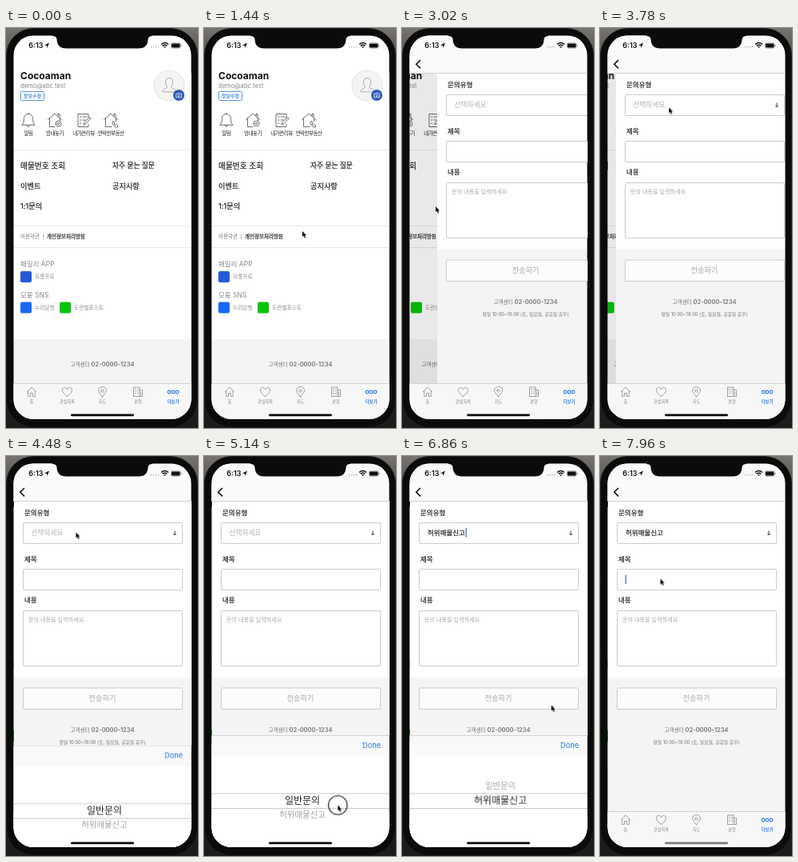
These frames come from a looping animation (240 px wide and 500 px high, 8 s). An HTML page:

```html
<!DOCTYPE html>
<html lang="ko">
<head>
<meta charset="utf-8">
<title>1:1 문의</title>
<style>
  html, body { margin: 0; width: 100%; height: 100%; overflow: hidden; background: #000; }
  svg { display: block; width: 240px; height: 500px; }
  text { font-family: Inter, "Noto Sans CJK KR", "Noto Sans CJK", sans-serif; white-space: pre; }
  .medium { stroke: #222; stroke-width: .22; }
  .line { fill: none; stroke: #444; stroke-width: .8; stroke-linejoin: round; stroke-linecap: round; }
  .tab { stroke: #8a8a8a; }
</style>
</head>
<body>
<svg id="stage" viewBox="0 0 240 500"></svg>
<script>
const LOOP = 8000, WIDTH = 221;
const PHONE = '02-0000-1234';

// Text placed by its vertical centre
function text(x, cy, str, size, fill = '#222', opt = '') {
  return `<text x="${x}" y="${(cy + size * .37).toFixed(2)}" font-size="${size}" fill="${fill}" ${opt}>${str}</text>`;
}
const mid = 'text-anchor="middle"', medium = 'class="medium"';
const rect = (x, y, w, h, fill, opt = '') =>
  `<rect x="${x}" y="${y}" width="${w}" height="${h}" fill="${fill}" ${opt}/>`;
const rule = (y, color = '#e8e8e8') => rect(9, y, WIDTH + 2, 1, color);
const path = (d, opt = 'class="line"') => `<path d="${d}" ${opt}/>`;
const at = (x, y, body, opt = '') => `<g transform="translate(${x} ${y})" ${opt}>${body}</g>`;
const field = (y, h, fill = '#fff') =>
  rect(21.5, y + .5, 199, h - 1, fill, 'rx="1.5" stroke="#cbcbcb"');
const support = y => text(120.5, y,
  `고객센터 <tspan font-weight="600" font-size="7.5">${PHONE}</tspan>`, 6.6, '#777', mid);

const house = 'M-5.5 -.5 0 -6 5.5 -.5M-4.3 -1.5V5.5H-1.5V1.5H1.5V5.5H4.3V-1.5';

function homePage() {
  const label = (x, s) => text(x, 132, s, 6.6, '#222', mid + ' letter-spacing="-.6"');
  const shortcuts = [
    [28, '알림', 'M-8 5.5C-5 3-6 0-5.5-3C-5-6.5-2.5-8 0-8S5-6.5 5.5-3C6 0 5 3 8 5.5ZM-2 6Q0 10 2 6M0-8V-9'],
    [61, '방내놓기', 'M-8.5-1 0-8.5 8.5-1M-6.5-2.5V8H0M6.5-2.5V0M4-5.5V-8H6V-4M1 4A3.5 3.5 0 1 0 8 4A3.5 3.5 0 1 0 1 4M3.3 4A1.2 1.2 0 1 0 5.7 4A1.2 1.2 0 1 0 3.3 4'],
    [97, '내가쓴리뷰', 'M6-3V-8H-7V8H6V5M-4.5-4.5H-3M-1-4.5H4M-4.5-.5H-3M-1-.5H2M-4.5 3.5H-3M0 5 1 2 7.5-4 9-2.5 3 4Z'],
    [131, '연락한부동산', 'M-8.5-1 0-8.5 8.5-1M-6.5-2.5V8H1M6.5-2.5V1M4-5.5V-8H6V-4M2 2C2 6 5 9 8.5 8.5V6L6.5 5 5.5 6 4 4.5 5 3.5 4 1.5Z']
  ];
  const menu = [
    [18, 172, '매물번호 조회', 9.7], [133, 172, '자주 묻는 질문', 8.7],
    [18, 197.5, '이벤트', 9.2], [133, 197.5, '공지사항', 9.2], [18, 223, '1:1문의', 9.3]
  ];
  const apps = [
    [18, 304, '#2459d8', '모룽프로'], [18, 342.5, '#1769f0', '누리담벗'], [67, 342.5, '#06c40a', '도란별포스트']
  ];
  return rect(9, 9, WIDTH + 2, 480, '#fff') +
    text(18, 59.5, 'Cocoaman', 12, '#111', 'font-weight="700"') +
    text(18, 72, 'demo@abc.test', 7.6, '#888') +
    rect(18.5, 79.5, 29, 11, '#fff', 'rx="1" stroke="#5a97e4"') +
    text(33, 85, '정보수정', 6.1, '#2a74da', mid + ' stroke="#2a74da" stroke-width=".15"') +
    `<circle cx="204" cy="72" r="19" fill="#f4f4f4" stroke="#e2e2e2"/>` +
    at(204, 71, path('M-8 8.5C-8 4-3 5-2.5 2.5C-6-2-5-8.5 0-8.5S6-2 2.5 2.5C3 5 8 4 8 8.5Z'), 'opacity=".5"') +
    `<circle cx="216" cy="84" r="7" fill="#2d5bb4"/>` +
    at(216, 84, path('M-3.5-1.7H-1.7L-1-2.8H1L1.7-1.7H3.5V2.8H-3.5ZM-1.3.5A1.3 1.3 0 1 0 1.3.5A1.3 1.3 0 1 0-1.3.5',
      'fill="none" stroke="#fff" stroke-width=".7"')) +
    shortcuts.map(([x, s, d]) => at(x, 115.5, path(d)) + label(x, s)).join('') +
    rule(152) +
    menu.map(([x, y, s, size]) => text(x, y, s, size, '#222', medium)).join('') +
    rule(247) + text(18, 261, '이용약관', 6.5, '#777') + rect(46, 257.5, .8, 7, '#aaa') +
    text(51, 261, '개인정보처리방침', 6.5, '#333', medium) + rule(274) +
    text(18, 295, '패밀리 APP', 8.5, '#888') + text(18, 333.5, '모룽 SNS', 8.5, '#888') +
    apps.map(([x, y, c, s]) => rect(x, y, 14, 14, c, 'rx="2"') + text(x + 18, y + 7, s, 6.7, '#888')).join('') +
    rect(9, 389, WIDTH + 2, 100, '#f4f4f4') + support(420.3);
}

function formPage() {
  const label = (y, s) => text(23, y, s, 8.5, '#222', medium);
  return rect(10, 56, WIDTH + 1, 221, '#fff') + rect(10, 276.5, WIDTH + 1, 213, '#f4f4f4') +
    label(71, '문의유형') + field(83, 27) +
    text(31.5, 96, '선택하세요', 8.7, '#b2b2b2', 'id="hint"') +
    text(32, 96, '허위매물신고', 8.5, '#222', 'id="choice" class="medium"') +
    path('M211 93.5V98.5M209.3 97 211 98.8 212.7 97', 'fill="none" stroke="#222" stroke-width=".9"') +
    rect(31.6, 90, 1.2, 11.5, '#3d62d2', 'id="caret1"') +
    rect(79.6, 90, 1.2, 11.5, '#3d62d2', 'id="caret2"') +
    label(129, '제목') + field(141, 27) + rect(31.6, 148.5, 1.2, 11.5, '#3d62d2', 'id="caret3"') +
    label(180, '내용') + field(193, 70) + text(28, 204, '문의 내용을 입력하세요.', 7.1, '#aaa') +
    field(289.5, 27.5, '#fcfcfc') + text(120.5, 303, '전송하기', 9.2, '#a8a8a8', mid) +
    support(342.3) + text(120.5, 358, '평일 10:00~18:00 (토, 일요일, 공휴일 휴무)', 5.8, '#777', mid);
}

function tabBar() {
  const tabs = [
    [32, '홈', house],
    [76.5, '관심목록', 'M0 5.5C-9-.5-6-6-3-5.5C-1-5.5 0-3.5 0-3C0-3.5 1-5.5 3-5.5C6-6 9-.5 0 5.5Z'],
    [120.5, '지도', 'M0 6C-3 2-5 0-5-2A5 4.5 0 0 1 5-2C5 0 3 2 0 6ZM-1.7-1.5A1.7 1.7 0 1 0 1.7-1.5A1.7 1.7 0 1 0-1.7-1.5'],
    [165, '분양', 'M-5.5 5.5V-6H2V5.5M2-2.5H5.5V5.5H-5.5M-3.5-3.5H-2.5M-.5-3.5H.3M-3.5-1H-2.5M-.5-1H.3M-3.5 1.5H-2.5M-.5 1.5H.3M3.5 0V1M3.5 2.5V3.5']
  ];
  const ring = x => `<circle cx="${x}" cy="455" r="1.9" fill="none" stroke="#2a7de6" stroke-width="1.1"/>`;
  return rect(9, 444, WIDTH + 2, 45, '#f7f7f7') + rule(444, '#d2d2d2') +
    tabs.map(([x, s, d]) => at(x, 455, path(d, 'class="line tab"')) + text(x, 467, s, 5.2, '#8a8a8a', mid)).join('') +
    [204, 209, 214].map(ring).join('') + text(209, 467, '더보기', 5.3, '#2a7de6', mid + ' font-weight="700"');
}

function picker() {
  const row = (id, s) => `<text id="${id}" y="4.4" font-size="12" text-anchor="middle">${s}</text>`;
  return rect(9, 349, WIDTH + 2, 140, '#fff') + rect(9, 349, WIDTH + 2, 25, '#f9f9f9') + rule(349, '#d4d4d4') +
    text(221, 362, 'Done', 9.2, '#2677e0', 'text-anchor="end"') +
    rule(421.5, '#c8c8c8') + rule(440, '#c8c8c8') + row('row1', '일반문의') + row('row2', '허위매물신고');
}

function statusBar() {
  return text(28.3, 22, '6:13', 9, '#111', 'font-weight="600"') +
    path('M54 18.5 48 21.5 51 22 51.5 25Z', 'fill="#111"') +
    [182, 185, 188, 191].map(x => `<circle cx="${x - .5}" cy="23.8" r=".8" fill="#aaa"/>`).join('') +
    path('M194 20.5Q198.5 16.5 203 20.5M195.7 22.4Q198.5 20 201.3 22.4M197.5 24.2Q198.5 23.4 199.5 24.2',
      'fill="none" stroke="#111" stroke-width="1.4"') +
    rect(206.4, 18.9, 11.6, 6.2, 'none', 'rx="1.6" stroke="#777" stroke-width=".7"') +
    rect(207, 19.5, 10.4, 5, '#111', 'rx="1"') + rect(218.6, 21, 1, 2, '#777', 'rx=".5"');
}

document.getElementById('stage').innerHTML =
  '<defs><clipPath id="screen"><rect x="9.5" y="9.5" width="222" height="479.3" rx="24.5"/></clipPath>' +
  '<linearGradient id="desk" x2="0" y2="1"><stop stop-color="#77736f"/><stop offset=".2" stop-color="#1c1c1c"/></linearGradient></defs>' +
  rect(0, 0, 240, 500, 'url(#desk)') + rect(.5, .5, 239, 499, '#0b0b0b', 'rx="34" stroke="#222"') +
  '<g clip-path="url(#screen)">' +
    `<g id="home">${homePage()}</g>` +
    rect(9, 9, WIDTH + 2, 480, '#000', 'id="dim"') +
    `<g id="form">${formPage()}</g>` +
    `<g id="header">${rect(9, 9, WIDTH + 2, 47.5, '#fafafa')}${rule(56, '#d0d0d0')}` +
      path('M23 40 17.8 45.2 23 50.4', 'fill="none" stroke="#111" stroke-width="1.6"') + '</g>' +
    tabBar() + `<g id="picker">${picker()}</g>` +
    rect(81, 482.5, 79, 2.8, '#0a0a0a', 'rx="1.4" id="grip"') +
    statusBar() +
  '</g>' +
  path('M58 9H183V10Q178 10 177.5 14Q177 25.5 166 25.5H75Q64 25.5 63.5 14Q63 10 58 10Z', 'fill="#0b0b0b"') +
  '<g id="cursor"><circle id="press" r="11.7" fill="none" stroke="#000" stroke-width="1.1"/>' +
    path('M0 0V7L1.6 5.6 2.9 8.4 4.1 7.9 2.9 5.2H5Z', 'fill="#000" stroke="#fff" stroke-width=".8" paint-order="stroke"') +
  '</g>';

// keys: [time, properties, easing towards the next key]
function play(id, keys) {
  const frames = keys.map(([t, props, easing = 'linear']) => ({ ...props, easing, offset: t / LOOP }));
  frames.push({ ...frames[frames.length - 1], offset: 1 });
  document.getElementById(id).animate(frames, { duration: LOOP, iterations: Infinity });
}
const move = (x, y, s = 1) => ({ transform: `translate(${x}px, ${y}px) scale(${s})` });
// Hard on/off changes; starts hidden, each time flips
const toggle = (id, ...times) =>
  play(id, [0, ...times].map((t, i) => [t, { opacity: i % 2 }, 'step-end']));

// The push is a critically damped spring that stalls at 10px, then settles
const slide = [[0, WIDTH], [2760, WIDTH]];
for (let t = 20; t < 360; t += 20) {
  const k = 12.8 * t / 1000;
  slide.push([2760 + t, WIDTH * (1 + k) * Math.exp(-k)]);
}
slide.push([3120, 10], [4260, 10], [4320, 4], [4400, 0]);
play('form', slide.map(([t, x]) => [t, move(x, 0)]));
play('home', slide.map(([t, x]) => [t, move(.3 * (x - WIDTH), 0)]));
play('dim', slide.map(([t, x]) => [t, { opacity: .1 * (1 - x / WIDTH) }]));
play('header', slide.map(([t, x]) => [t, { opacity: Math.min(1, 1.25 * (1 - x / WIDTH)) }]));

const out = 'cubic-bezier(.2, .7, .2, 1)', both = 'ease-in-out';
play('picker', [
  [0, move(0, 140)], [4280, move(0, 140), out], [4720, move(0, 0)],
  [7400, move(0, 0), out], [7560, move(0, 140)]
]);
const on = { fill: '#222' }, off = { fill: '#a6a6a6' };
play('row1', [
  [0, { ...move(123, 431), ...on }], [5280, { ...move(123, 431), ...on }, both], [5800, { ...move(123, 412.5, .87), ...off }]
]);
play('row2', [
  [0, { ...move(123, 448, .87), ...off }], [5280, { ...move(123, 448, .87), ...off }, both], [5800, { ...move(123, 430), ...on }]
]);

play('cursor', [
  [0, move(250, 372)], [20, move(250, 372), out], [340, move(223, 360)],
  [640, move(223, 360), both], [1180, move(123, 254)],
  [1440, move(123, 254), both], [2100, move(42, 223)],
  [3360, move(42, 223), both], [3840, move(87.5, 95.5)],
  [4500, move(87.5, 95.5), both], [5060, move(167.3, 436.5)],
  [5260, move(167.3, 436.5), both], [5800, move(167.3, 410.5)],
  [6060, move(167.3, 410.5), both], [6480, move(174, 353)],
  [6740, move(174, 353), 'ease-in'], [6880, move(190, 300)], [7180, move(75.5, 153.5)]
]);
toggle('press', 2580, 2760, 3980, 4260, 5140, 6000, 7220, 7420);
toggle('caret1', 4700, 5100, 5500, 5780, 5980, 6040);
toggle('caret2', 6040, 6460, 6760, 7240);
toggle('caret3', 7440);
toggle('choice', 6040);
play('hint', [[0, { opacity: 1 }, 'step-end'], [6040, { opacity: 0 }, 'step-end']]);
play('grip', [[0, { fill: '#0a0a0a' }, 'step-end'], [7560, { fill: '#7c7c7c' }, 'step-end']]);
</script>
</body>
</html>
```
